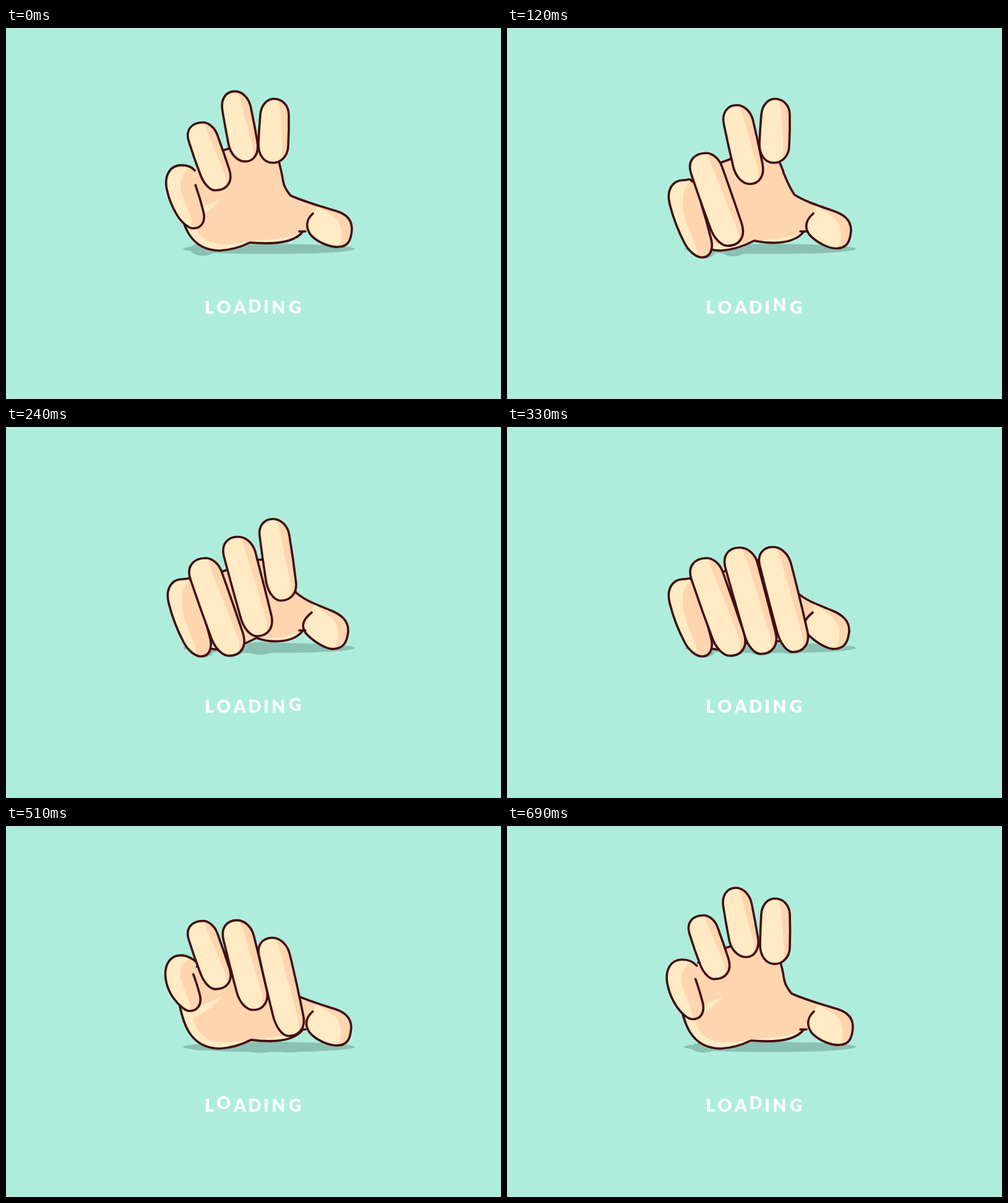
Write an HTML page that moves like this. It is 800x600 px and loops after 0.72 s.

```html
<!DOCTYPE html>
<html lang="en">
<head>
<meta charset="utf-8">
<title>Loading</title>
<style>
  html, body { margin: 0; width: 100%; height: 100%; overflow: hidden; background: #aeeddc; }
  svg { display: block; width: 800px; height: 600px; }
  .line { fill: none; stroke: #430e10; stroke-width: 3.6; stroke-linecap: round; stroke-linejoin: round; }
  .light { fill: #ffeac4; }
  .skin { fill: #ffd5b0; }
  text { font: 900 28px Lato, "Open Sans", sans-serif; fill: #fff; text-anchor: middle; }
</style>
</head>
<body>
<svg id="stage" viewBox="0 0 800 600">
  <defs id="defs"></defs>
</svg>
<script>
const LOOP = 720, STEP = 30;
const stage = document.getElementById('stage');
const defs = document.getElementById('defs');

function add(tag, attrs, parent = stage) {
  const el = document.createElementNS('http://www.w3.org/2000/svg', tag);
  for (const k in attrs) el.setAttribute(k, attrs[k]);
  parent.appendChild(el);
  return el;
}
const setD = (el, d) => el.setAttribute('d', d);
const lerp = (a, b, k) => a + (b - a) * k;
const mix = (a, b, k) => [lerp(a[0], b[0], k), lerp(a[1], b[1], k)];
const at = p => p[0].toFixed(2) + ' ' + p[1].toFixed(2);

// Blend two path strings that share the same commands
function blend(a, b, k) {
  const to = b.match(/-?[\d.]+/g);
  let i = 0;
  return a.replace(/-?[\d.]+/g, n => lerp(+n, +to[i++], k).toFixed(2));
}

// Smooth cyclic interpolation through [time, value] keys without overshoot
function track(keys) {
  const n = keys.length;
  const key = i => {
    const turn = Math.floor(i / n), k = keys[i - turn * n];
    return [k[0] + turn * LOOP, k[1]];
  };
  const rate = i => (key(i + 1)[1] - key(i)[1]) / (key(i + 1)[0] - key(i)[0]);
  const slope = i => {
    const a = rate(i - 1), b = rate(i);
    return a * b > 0 ? 2 * a * b / (a + b) : 0;
  };
  return t => {
    let i = n - 1;
    while (keys[i][0] > t) i--;
    const [t0, v0] = key(i), [t1, v1] = key(i + 1);
    const w = t1 - t0, u = (t - t0) / w, r = 1 - u;
    return v0 * (1 + 2 * u) * r * r + w * slope(i) * u * r * r
         + v1 * u * u * (3 - 2 * u) - w * slope(i + 1) * u * u * r;
  };
}

// Poses: top, upper right, lower right, bottom, lower left, upper left
const FINGERS = [
  { open:   [[282, 206.5], [302, 237], [312, 268], [295, 294], [270, 274], [258, 246]],
    closed: [[286, 246], [313, 281], [330, 342], [315, 371], [287, 348], [263, 285]],
    tip: [[309, 219], [299, 248]], bow: [1, 4],
    edge: ['M300 211 C285 216 278 230 282 243 C286 258 296 272 298 294',
           'M298 247 C285 256 281 275 286 300 C291 325 306 345 309 371'],
    shadow: [318, 20, 15],
    bend: track([[0, .39], [120, 1], [330, 1], [400, .66], [450, .265], [470, .165], [565, 0], [690, .24]]) },
  { open:   [[317, 137], [339.5, 156], [355, 201], [332, 234], [310, 211], [294.5, 166]],
    closed: [[323, 212], [348.5, 234], [382.5, 332], [360, 370], [332, 342], [298, 246]],
    bow: [.5, 1], shadow: [366, 20, 12],
    bend: track([[0, .21], [120, .87], [180, 1], [370, 1], [450, .65], [520, .17], [580, 0], [690, .1]]) },
  { open:   [[370, 100], [395.5, 126], [405.5, 180], [386, 212], [359, 184], [349.5, 130]],
    closed: [[376, 195], [404.5, 219], [434, 332], [410, 367], [384, 337], [353, 228]],
    bow: [.5, .5], shadow: [411, 22, 11.5],
    bend: track([[0, .025], [120, .26], [240, .815], [320, 1], [420, 1], [450, .95], [520, .48], [570, .15], [645, -.01], [690, 0]]) },
  { open:   [[433, 114.5], [457, 140], [456, 192], [431, 218], [408, 186], [411, 140]],
    closed: [[430, 194], [459, 221], [485.5, 330], [462, 364], [436, 330], [408.5, 224]],
    bow: [1, .5], shadow: [460, 22, 9],
    bend: track([[0, 0], [120, 0], [240, .43], [330, 1], [460, 1], [570, .46], [620, .17], [690, .035]]) }
];

const press = track([[0, 0], [120, .5], [225, 1], [340, 1], [450, .5], [570, 0]]);

const PALM = {
  base: ['M279 282 C286 318 296 359 345 360 C365 359 380 354 394 347 C420 349 462 351 479 330',
         'M279 282 C286 318 296 359 345 360 C368 359 388 350 405 341 C425 349 464 351 480 329'],
  thumb: ['496 300 C485 310 484 322 492 334 C503 347 525 355 537 354 C553 354 558 343 559 325 C559 305 543 298 527 294 C500 286 478 279 460 271 C449 258 448 250 447 243 C446 234 443 226 441 215 C425 190 385 187 357 196 C338 202 320 211 309 221',
          '494 300 C482 310 475 320 485 334 C498 348 517 359 529 359 C546 358 551 348 553 331 C554 312 540 303 526 297 C505 288 485 282 469 268 C461 252 455 240 448 228 C446 224 443 220 438 215 C425 212 385 214 357 231 C338 238 320 246 306 255'],
  nail: ['M496 300 C485 310 484 322 492 334 C503 347 525 355 537 354 C546 340 544 318 532 307 C522 299 510 294 503 288Z',
         'M494 300 C482 310 475 320 485 334 C498 348 517 359 529 359 C541 345 540 322 526 308 C516 300 505 295 498 284Z'],
  heel: ['M394 347 C415 341 455 343 476 330 L480 340 L440 358 L394 352Z',
         'M405 341 C420 343 455 343 477 329 L481 340 L440 358 L405 350Z']
};
const PALM_GLOW = 'M349 275 C332 284 318 290 302 296 L270 285 L280 366 L370 366 L392 346 C360 352 338 352 322 342 C309 333 304 322 303 310 C322 302 335 292 349 275Z';

function side(a, b, bow) {
  const dx = b[0] - a[0], dy = b[1] - a[1], len = Math.hypot(dx, dy);
  return [(a[0] + b[0]) / 2 + dy / len * bow, (a[1] + b[1]) / 2 - dx / len * bow];
}
// Extend the line b-a to height y
const reach = (a, b, y) => [a[0] + (y - a[1]) * (a[0] - b[0]) / (a[1] - b[1]), y];

function arc(a, corner, b) {
  return ` C${at(mix(a, corner, .58))} ${at(mix(b, corner, .58))} ${at(b)}`;
}

function fingerPaths(f, k) {
  const [T, R1, R2, B, L2, L1] = f.open.map((p, i) => mix(p, f.closed[i], k));
  const r = side(R1, R2, f.bow[0]), l = side(L2, L1, f.bow[1]);
  let body = `M${at(R1)} Q${at(r)} ${at(R2)}`
    + arc(R2, reach(R2, r, B[1]), B) + arc(B, reach(L2, l, B[1]), L2)
    + ` Q${at(l)} ${at(L1)}` + arc(L1, reach(L1, l, T[1]), T);
  let shade;
  if (f.tip) {
    const S = mix(...f.tip, k);
    body += ` C${at([T[0] + 10, T[1]])} ${at([S[0] - 5, S[1] - 6])} ${at(S)}`;
    shade = blend(...f.edge, k) + ' L420 420 L420 190Z';
  } else {
    body += arc(T, reach(R1, r, T[1]), R1);
    const U = mix(R1, L1, .29), V = mix(R2, L2, .2);
    shade = `M${at([T[0] + 2, T[1] - 1])} Q${at(reach(U, V, T[1] + 4))} ${at(U)} L${at(V)}`
      + ` Q${at(reach(V, U, B[1] - 4))} ${at([B[0] + 5, B[1] + 2])} H600 V${(T[1] - 2).toFixed(2)}Z`;
  }
  return [body, shade];
}

function clipShape(id) {
  return add('path', {}, add('clipPath', { id }, defs));
}

// Build the scene from back to front
const ground = add('g', { fill: '#8bc1b3' });
add('ellipse', { cx: 425, cy: 357.3, rx: 139, ry: 8.3 }, ground);
for (const f of FINGERS) {
  f.blob = add('ellipse', { cx: f.shadow[0], cy: 358, rx: f.shadow[1] }, ground);
}

const palm = {
  clip: clipShape('palm'),
  fill: add('path', { class: 'skin' }),
  glow: add('path', { class: 'light', d: PALM_GLOW, 'clip-path': 'url(#palm)' }),
  heel: add('path', { class: 'light', 'clip-path': 'url(#palm)' }),
  nail: add('path', { class: 'light', 'clip-path': 'url(#palm)' }),
  base: add('path', { class: 'line' }),
  thumb: add('path', { class: 'line' })
};
add('path', { class: 'line', d: 'M474 329 H484' });

FINGERS.forEach((f, i) => {
  const id = 'finger' + i;
  f.clip = clipShape(id);
  f.fill = add('path', { class: 'light' });
  f.shade = add('path', { class: 'skin', 'clip-path': `url(#${id})` });
  f.line = add('path', { class: 'line' });
});

const LETTER_X = [328.5, 352, 378, 402, 420.5, 440.5, 467];
const letters = [...'LOADING'].map((c, i) => {
  const el = add('text', { x: LETTER_X[i], y: 462 });
  el.textContent = c;
  return el;
});

function hop(t, i) {
  const gap = Math.abs((t - 430 - i * 85 + LOOP * 2.5) % LOOP - LOOP / 2);
  return gap < 75 ? 4 * Math.cos(gap / 75 * Math.PI / 2) ** 2 : 0;
}

function draw(t) {
  const q = press(t);
  const base = blend(...PALM.base, q), thumb = blend(...PALM.thumb, q);
  const whole = `${base} L486 329 L${thumb}Z`;
  setD(palm.clip, whole);
  setD(palm.fill, whole);
  setD(palm.base, base);
  setD(palm.thumb, 'M' + thumb);
  setD(palm.nail, blend(...PALM.nail, q));
  setD(palm.heel, blend(...PALM.heel, q));

  for (const f of FINGERS) {
    const k = f.bend(t), [body, shade] = fingerPaths(f, k);
    setD(f.clip, body + 'Z');
    setD(f.fill, body + 'Z');
    setD(f.shade, shade);
    setD(f.line, body);
    f.blob.setAttribute('ry', (f.shadow[2] * Math.max(0, k) ** .4).toFixed(2));
  }
  letters.forEach((el, i) => el.setAttribute('y', (462 - hop(t, i)).toFixed(2)));
}

let start;
function tick(now) {
  if (start === undefined) start = now;
  const t = Math.max(0, now - start) % LOOP;
  draw(Math.floor(t / STEP) * STEP);
  requestAnimationFrame(tick);
}
draw(0);
requestAnimationFrame(tick);
</script>
</body>
</html>
```
